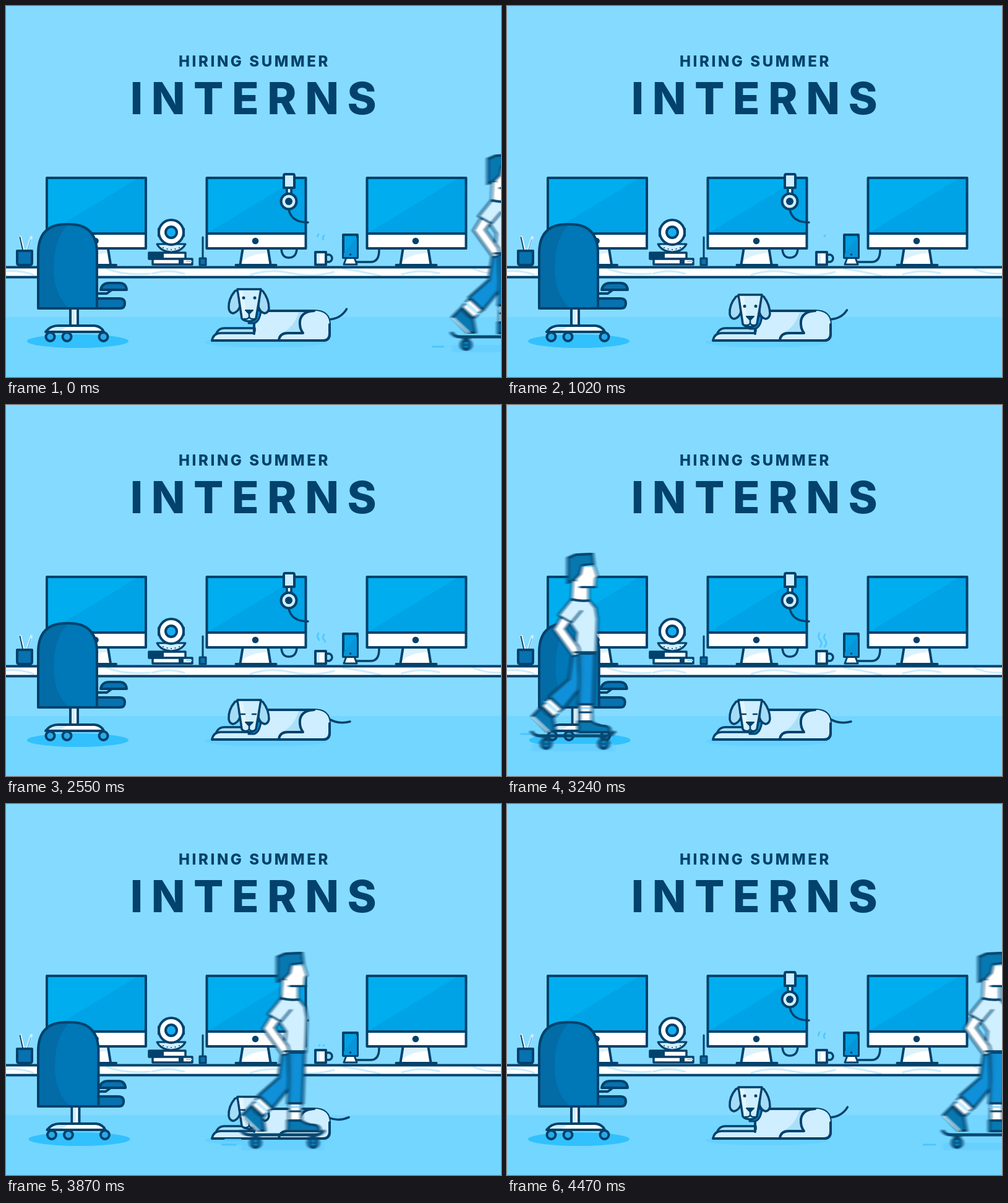
Write an HTML page with a canvas that moves like this. It is 800x600 px and loops after 4500 ms.

```html
<!DOCTYPE html>
<html lang="en">
<head>
<meta charset="utf-8">
<title>Hiring summer interns</title>
<style>
html, body { margin: 0; width: 100%; height: 100%; overflow: hidden; background: #85dbff; }
canvas { display: block; width: 800px; height: 600px; }
</style>
</head>
<body>
<canvas id="stage" width="800" height="600"></canvas>
<script>
const LOOP = 4500;
const NAVY = '#02426c', WHITE = '#fff', PALE = '#cfeeff', BLUE = '#00aeef', MID = '#0b8fd3', DEEP = '#0871af';
const stage = document.getElementById('stage').getContext('2d');
let ctx = stage;

function shape(d, fill, width = 4, stroke = NAVY) {
  const path = new Path2D(d);
  if (fill) { ctx.fillStyle = fill; ctx.fill(path); }
  if (width) { ctx.lineWidth = width; ctx.strokeStyle = stroke; ctx.stroke(path); }
}
const line = (d, width = 4, color = NAVY) => shape(d, null, width, color);

function oval(x, y, rx, ry, fill, width = 0, stroke = NAVY) {
  ctx.beginPath();
  ctx.ellipse(x, y, rx, ry, 0, 0, Math.PI * 2);
  if (fill) { ctx.fillStyle = fill; ctx.fill(); }
  if (width) { ctx.lineWidth = width; ctx.strokeStyle = stroke; ctx.stroke(); }
}
const disc = (x, y, r, fill, width, stroke) => oval(x, y, r, r, fill, width, stroke);

function box(x, y, w, h, fill) {
  ctx.fillStyle = fill;
  ctx.fillRect(x, y, w, h);
}

function shifted(x, y, draw) {
  ctx.save();
  ctx.translate(x, y);
  draw();
  ctx.restore();
}

function ramp(t, from, to) {
  const u = Math.min(1, Math.max(0, (t - from) / (to - from)));
  return u * u * (3 - 2 * u);
}
const mix = (a, b, u) => a + (b - a) * u;

function roundStyle(c) {
  c.lineCap = 'round';
  c.lineJoin = 'round';
}

function title(text, y, size, spacing) {
  ctx.font = `800 ${size}px Inter, sans-serif`;
  ctx.letterSpacing = spacing + 'px';
  ctx.textAlign = 'center';
  ctx.fillStyle = NAVY;
  ctx.fillText(text, 399.7 + spacing / 2, y);
}

function backdrop() {
  box(0, 0, 800, 600, '#85dbff');
  box(0, 503, 800, 97, '#73d6ff');
  title('HIRING SUMMER', 98, 24, 3.6);
  title('INTERNS', 174.5, 71.5, 13.6);
}

function desk() {
  box(0, 422, 800, 17, WHITE);
  line('M0 429Q25 427 44 435M163 425Q190 436 232 433M236 433Q262 425 288 433M395 435Q425 424 460 432T530 430' +
    'M545 425Q575 429 604 436M640 434Q668 425 700 432M755 425Q775 434 802 433', 3, '#c9edff');
  line('M-5 422.5H805M-5 438.5H805');
}

function monitor(x) {
  shifted(x, 0, () => {
    shape('M58 393H99L103 419H54Z', WHITE, 0);
    shape('M58 393H99L100 399Q70 401 57 413Z', '#d9f2ff', 0);
    line('M58 393L54 418M99 393L103 418M47 419H112');
    shape('M0 278H160V392H0Z', WHITE, 0);
    box(0, 278, 160, 90, BLUE);
    shape('M0 368L148 278H160V368Z', '#00a3e6', 0);
    line('M0 368H160M0 278H160V392H0Z');
    disc(78.5, 380, 5.3, NAVY);
  });
}

function pencils() {
  line('M23 374L28 394', 4, WHITE);
  line('M22.5 374L27 394', 2);
  line('M41 374L34 394', 4, PALE);
  line('M40 378L35 394', 1.5, '#4cb9ec');
  shape('M18 396H42V415Q42 419 38 419H22Q18 419 18 415Z', DEEP);
}

function webcam() {
  shape('M231 399H290V409H231Z', WHITE, 3.5);
  box(231, 399, 24, 10, NAVY);
  shape('M237 409H301V418H237Z', WHITE, 3.5);
  box(279, 409, 8, 9, NAVY);
  line('M292 413H300', 2, '#8ed8fb');
  shape('M244 385H290Q284 397 267 398Q250 397 244 385Z', PALE, 3);
  for (let i = 0; i < 5; i++) disc(254 + i * 6.5, 391 + [0, 2, 3, 2, 0][i], 1, NAVY);
  line('M246.500 360V372M287.500 360V372', 3);
  disc(267, 366, 20, WHITE, 4);
  disc(267, 366, 9, '#16aef0', 4);
}

function headphones() {
  line('M445 393Q446 407 457 407Q469 407 470 393', 3.5);
  line('M457 329Q461 350 488 350', 3.5);
  shape('M454 294H461V305H454Z', WHITE, 3.5);
  shape('M451 272H464Q466 272 466 275V294H449V275Q449 272 451 272Z', PALE);
  disc(457, 316, 12.5, PALE, 4);
  disc(457, 316, 6, NAVY);
}

function deskTools() {
  line('M318 374V408', 3);
  shape('M313 408H323V419H313Z', DEEP, 3);
  disc(521, 408, 6, null, 3.5);
  shape('M500 398H517V418.500H500Z', WHITE, 4);
  box(502, 400, 5, 16, PALE);
  line('M567 414H589Q603 414 603 395', 3.5);
  shape('M550 407H563L567 418H546Z', WHITE, 3);
  shape('M545 370H568V407H545Z', '#00a0e3', 4);
  shape('M546 400L567 374V406H546Z', '#0795d8', 0);
  disc(556.5, 402, 1.8, NAVY);
}

function steam(t) {
  const phase = t % 900;
  const age = phase < 250 ? phase + 900 : phase;
  const head = ramp(age, 230, 540);
  const wisp = (d, tail) => {
    const length = 26, start = tail * length, end = head * length;
    if (end - start < 0.5) return;
    ctx.setLineDash([end - start, 100]);
    ctx.lineDashOffset = -start;
    line(d, 3, '#55c9fc');
    ctx.setLineDash([]);
  };
  wisp('M506 391Q510 386 507 381Q501 375 505 369', Math.max(0, age - 540) / 470);
  wisp('M513 391Q518 386 515 381Q510 376 514 371', Math.max(0, age - 540) / 620);
}

function chair(t) {
  const turn = 4 * ramp(t, 3060, 3460) * (1 - ramp(t, 3700, 4100));
  oval(116 + turn, 542, 82, 11, '#32c1fd');
  shifted(turn, 0, () => {
    shape('M104 488H116V518H104Z', WHITE, 4);
    box(106, 490, 5, 27, PALE);
    shape('M64 527Q72 517 84 517H143Q154 518 158 527Z', WHITE, 4);
    shape('M71 525Q77 519 86 519H99Q91 522 89 525Z', PALE, 0);
    for (const x of [71.5, 98.5, 157.5]) disc(x, 535, 7, '#2ba8e8', 4);
  });
  shifted(-turn * 0.75, 0, () => {
    line('M148 465H163L171 459');
    shape('M153 459Q155 448 167 448H183Q194 448 195 459Z', DEEP);
    shape('M145 473H184Q192 473 192 481Q192 489 184 489H145Z', DEEP);
  });
  const right = 147 + turn;
  const back = `M52 489V400Q52 353 97 353H${102 + turn}Q${right} 353 ${right} 400V489Z`;
  shape(back, '#0077b6', 0);
  ctx.save();
  ctx.clip(new Path2D(back));
  shifted(turn * 0.8, 0, () => shape('M40 345H112Q77 365 77 425Q77 470 106 492H40Z', '#036ba6', 0));
  ctx.restore();
  line(back);
}

function dog(t) {
  const late = t > 2700;
  const drop = late ? 1 - ramp(t, 3700, 4320) : ramp(t, 0, 2100);
  const tail = late ? 1 - ramp(t, 3700, 4200) : ramp(t, 1100, 1750);
  const lid = late ? 1 - ramp(t, 3820, 3960) : ramp(t, 1480, 1660);
  const wag = Math.sin(t / 75) * 2 * (1 - tail);
  oval(420, 544, 99, 8, '#66d1ff');

  const tipX = mix(550.5, 556, tail) - wag * 0.6, tipY = mix(490, 512, tail) + wag;
  line(`M521 507Q${mix(541, 536, tail)} ${mix(506, 517, tail)} ${tipX} ${tipY}`, 3.5);
  shape('M401 541V493H498Q523 493 523 516V530Q523 541 512 541Z', PALE, 4);
  shape('M470 539Q476 530 477 518Q479 497 497 495H473Q466 518 448 528Q440 533 441 539Z', '#a9dff9', 0);
  shape('M441 541Q442 529 455 529H480Q474 520 475 510Q477 494 498 493Q523 493 523 516V530Q523 541 512 541Z', PALE, 0);
  line('M441 541Q442 529 455 529H480Q474 521 475 510Q477 494 498 493');
  shape('M340 529Q344 521 353 521H402V531H340Z', '#a9dff9', 3.5);
  shape('M333 541Q335 529 347 529H402V541Z', PALE, 3.5);
  box(400, 527, 7, 12, PALE);
  line('M333 541H512Q523 541 523 530V515M401 494V530');

  shifted(0, mix(458, 477, drop), () => {
    shape('M402 34L412 35Q410 52 401 55H392Z', MID, 3);
    shape('M376 1L370 3Q359 16 360 31Q361 38 367 39Q375 37 378 28Z', '#a4dcf8', 3.5);
    shape('M410 1L415 3Q425 16 425 31Q424 38 418 39Q410 37 408 28Z', '#a4dcf8', 3.5);
    shape('M374 0H412L404 47Q402 51 393 52Q383 51 381 47Z', PALE, 3.5);
    shape('M376 2H383L388 37L384 46Z', '#e3f5ff', 0);
    const eyeY = mix(14, 23, drop);
    const nose = mix(0, 2, drop);
    for (const x of [384, 402]) {
      if (lid > 0.6) line(`M${x - 4} ${eyeY}h6`, 2.5);
      else oval(x, eyeY, 2.5, 2.5 * (1 - lid), NAVY);
    }
    shifted(0, nose, () => {
      shape('M387 34H399L393 40Z', NAVY, 2);
      line('M393 40V45M385 48Q391 49 393 45Q395 49 401 48', 2.5);
    });
  });
}

function skater() {
  box(234, 548, 132, 12, '#67d0fc');

  // rear leg, then front leg
  shape('M250 487L262 473L284 491L270 505Z', WHITE, 3);
  line('M256 480L277 498', 3, '#8ed8fb');
  shape('M235 503L250 488Q256 500 268 506L272 528H259Z', DEEP);
  line('M237 505L261 528', 3, WHITE);
  shape('M300 402H324L319 449L284 492L262 471L294 443Z', MID);
  shape('M311 482H331V514H311Z', WHITE, 3);
  line('M312 497H330', 3);
  line('M312 490H330', 3, '#8ed8fb');
  shape('M309 512H331Q340 519 352 519Q361 520 361 529H309Z', DEEP);
  shape('M309 402H336L333 484H309L311 444Z', MID);
  shape('M311 405H317L316 444L314 480H310L312 444Z', '#0a7fc0', 0);

  // torso, arm and head
  shape('M300 282L298 316L326 318V293Z', WHITE, 2.5);
  shape('M298 314Q312 318 327 316L337 328L340 346L338 402L303 400L306 368L293 349Z', PALE, 3);
  shape('M283 340L269 363L301 407L312 402L309 391L288 362L298 349Z', WHITE, 3);
  shape('M298 314L277 340L298 352L314 333L318 318Z', PALE, 0);
  line('M298 314L277 340L298 352L314 333', 3);
  line('M298 314Q312 318 327 316');
  line('M303 400H338', 3.5);
  shape('M306 262H334L340 277L337 281L336 295H306Z', WHITE, 0);
  line('M334 258L340 277L337 281L336 294', 2.5);
  line('M312 294.500H337', 3.5);
  shape('M292 247L304 242L332 241L334 257L315 259L312 273L304 281L292 288Z', DEEP, 3.5);
  line('M294 247L305 242L332 241', 4);

  line('M234 529Q239 535 246 535H355Q362 535 367 529', 5);
  for (const x of [257, 350]) {
    line(`M${x - 5} 538h10l-5 8z`, 3);
    disc(x, 548, 7.5, MID, 5);
    disc(x, 548, 2.5, NAVY);
  }
}

function layer() {
  const c = document.createElement('canvas');
  c.width = 180;
  c.height = 350;
  return c;
}

// Average shifted copies of the pose for horizontal motion blur.
function blurredSkater() {
  const sharp = layer(), soft = layer();
  ctx = sharp.getContext('2d');
  roundStyle(ctx);
  ctx.translate(-210, -225);
  skater();
  ctx = stage;
  const out = soft.getContext('2d'), copies = 8;
  out.globalCompositeOperation = 'lighter';
  out.globalAlpha = 1 / copies;
  for (let i = 0; i < copies; i++) out.drawImage(sharp, i - 3.5, 0);
  return soft;
}

function dash(x, y, length, t, from, to) {
  if (t <= from || t >= to) return;
  const visible = length * Math.sin(Math.PI * (t - from) / (to - from));
  line(`M${x} ${y}h${visible}`, 3, '#4cc6fb');
}

function ride(t) {
  const time = t < 700 ? t + LOOP : t;
  const dx = (time - 3600) * 0.54;
  if (dx < -380 || dx > 640) return;
  dash(203 + dx * 0.93, 532, 17, time, 3020, 3760);
  dash(208 + dx, 543, 25, time, 3420, 4380);
  dash(203 + dx, 551, 27, time, 3470, 4800);
  stage.drawImage(rider, 210 + dx, 225);
}

roundStyle(stage);
const rider = blurredSkater();

function render(now) {
  const t = now % LOOP;
  backdrop();
  desk();
  [66, 324.5, 583.5].forEach(monitor);
  pencils();
  webcam();
  headphones();
  deskTools();
  steam(t);
  chair(t);
  dog(t);
  ride(t);
}

const began = performance.now();
function tick() {
  render(performance.now() - began);
  requestAnimationFrame(tick);
}
tick();
</script>
</body>
</html>
```
